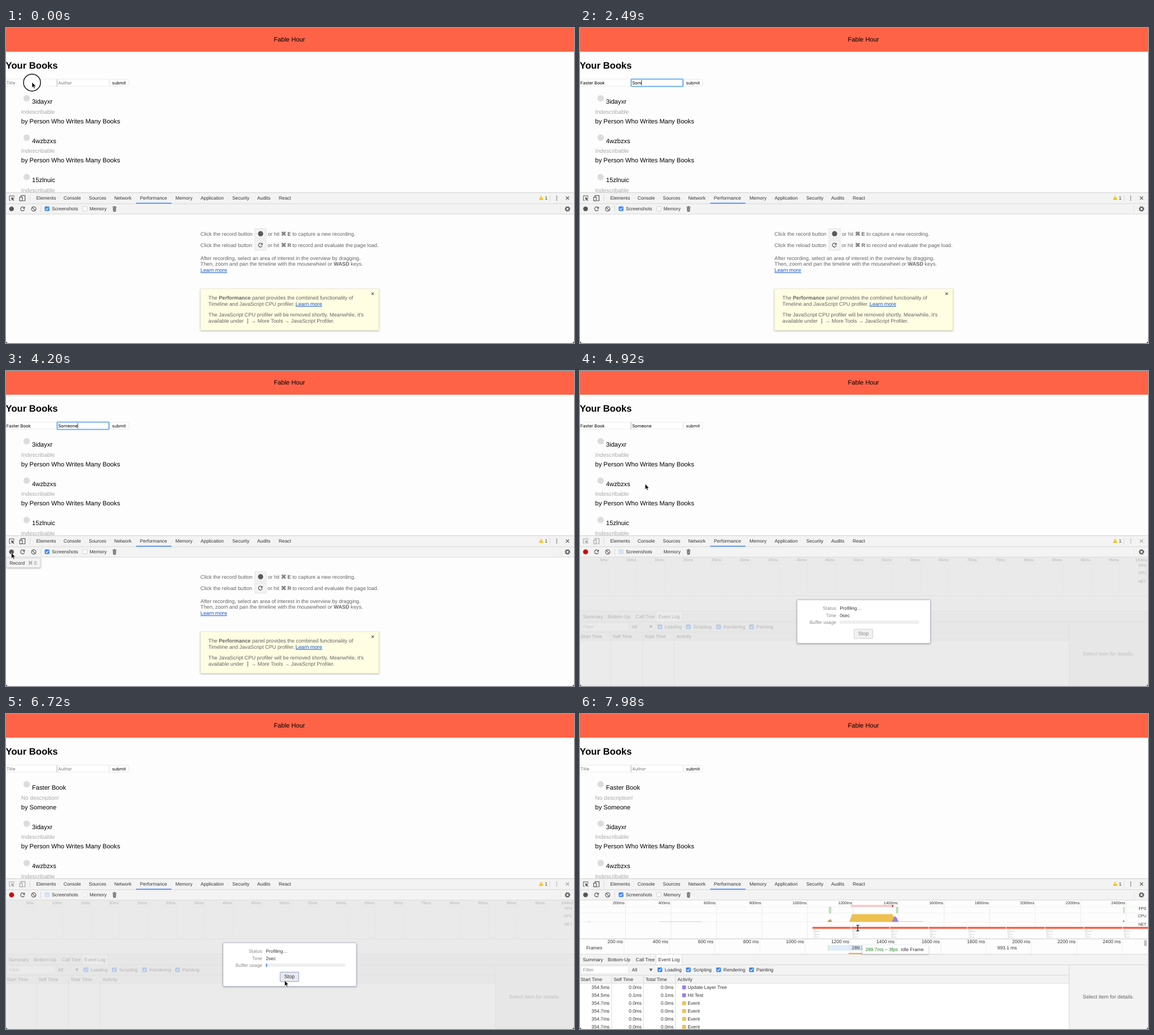
Animation of 1004x558 px, one loop 8 s. Source, as an HTML page:

```html
<!DOCTYPE html>
<html lang="en">
<head>
<meta charset="utf-8">
<title>Book list profiling</title>
<style>
html, body { margin: 0; width: 100%; height: 100%; overflow: hidden; background: #fdfdfd; }
svg { display: block; width: 1004px; height: 558px; }
text { font-family: "Liberation Sans", Arial, sans-serif; font-size: 8.37px; fill: #333; text-rendering: geometricPrecision; white-space: pre; }
.page { font-size: 11.156px; fill: #000; }
.h1 { font-size: 16.6px; font-weight: bold; fill: #000; }
.desc { font-size: 10.04px; fill: #a9a9a9; }
.field { font-family: Inter, "Liberation Sans", sans-serif; font-size: 7.67px; fill: #000; }
.hint { fill: #757575; }
.help { font-size: 9.2px; fill: #646464; }
.link { fill: #15c; text-decoration: underline; }
.tick { font-size: 6.97px; }
.gray { fill: #888; }
.end { text-anchor: end; }
.mid { text-anchor: middle; }
.b { font-weight: bold; }
.btn { font-size: 9.06px; }
.green { fill: #1b7d1b; }
.icon { fill: none; stroke: #5a5a5a; stroke-width: 1.2; }
.shadow { filter: drop-shadow(0 1px 1.5px rgba(0, 0, 0, .3)); }
</style>
</head>
<body>
<svg id="stage" viewBox="0 0 1004 558"></svg>
<script>
const LOOP = 8000;
const RECORD = 4400, PRESS = 5610, ADDED = 5900, STOP = 7150;
const titleKeys = [520, 660, 800, 930, 1040, 1160, 1280, 1420, 1540, 1680, 1800];
const authorKeys = [2220, 2340, 2460, 2580, 2700, 2820, 2960];
const TITLE_FOCUS = 60, AUTHOR_FOCUS = 2050, BLUR = 4350;

const text = (x, y, s, cls = '') => `<text x="${x}" y="${y}" class="${cls}">${s}</text>`;
const rect = (x, y, w, h, fill, more = '') => `<rect x="${x}" y="${y}" width="${w}" height="${h}" fill="${fill}" ${more}/>`;
const line = (x1, y1, x2, y2, c = '#ccc', w = .7) => `<path d="M${x1} ${y1}L${x2} ${y2}" stroke="${c}" stroke-width="${w}"/>`;
const dot = (x, y, r, fill) => `<circle cx="${x}" cy="${y}" r="${r}" fill="${fill}"/>`;
const icon = (d, more = '') => `<path class="icon" d="${d}" ${more}/>`;
// Visible during each [start, end) pair of times
const during = (times, ...parts) => `<g data-on="${times}">${parts.join('')}</g>`;
const range = (n, f) => Array.from({ length: n }, (_, i) => f(i)).join('');
const row = (list, y, cls) => list.map(([x, s]) => text(x, y, s, cls)).join('');

const reload = (x, y) => icon(`M${x + 2.8} ${y - 2.2}A3.5 3.5 0 1 0 ${x + 3.4} ${y + 1}`) +
  `<path d="M${x + 4} ${y - 4.2}v3.9h-3.9z" fill="#5a5a5a"/>`;
const check = (x, y) => rect(x, y, 8.4, 8.2, '#3b88f5', 'rx="1.6"') +
  icon(`M${x + 2} ${y + 4.2}l1.7 1.8l2.8-4`, 'style="stroke:#fff"');
const cross = (x, y, r) => icon(`M${x - r} ${y - r}l${2 * r} ${2 * r}m0 ${-2 * r}l${-2 * r} ${2 * r}`);
const menuDots = (x, y, gap) => [-gap, 0, gap].map(d => dot(x, y + d, .95, '#5a5a5a')).join('');

function book(i, [title, desc, author]) {
  const y = 124.5 + 69.75 * i;
  return dot(36.5, y, 5.7, '#dcdcdc') + text(46, y + 9.3, title, 'page') +
    text(26.7, y + 27, desc, 'desc') + text(26.7, y + 44.2, 'by ' + author, 'page');
}

function page() {
  const many = t => [t, 'Indescribable', 'Person Who Writes Many Books'];
  const old = ['3idayxr', '4wzbzxs', '15zlnuic'].map(many);
  const list = books => books.slice(0, 3).map((b, i) => book(i, b)).join('');
  const box = (x, w) => rect(x, 90.6, w, 12.4, '#fff', 'stroke="#e6e6da" stroke-width=".7"');
  const ring = (x, w) => rect(x, 90.4, w, 13, '#fff', 'rx="1" stroke="#6fb0f5" stroke-width="2"');
  return rect(0, 0, 1004, 42, '#ff6347') + text(501, 23.8, 'Fable Hour', 'page mid') +
    text(-.4, 72, 'Your Books', 'h1') +
    box(-.5, 90) + box(90.5, 91.5) + line(90.3, 91.5, 90.3, 103, '#aaa') +
    rect(183, 91, 34, 11.8, '#fff', 'rx="2" stroke="#dedede" stroke-width=".7"') +
    during([PRESS, ADDED], rect(182.7, 90.7, 34.8, 12.2, 'url(#press)', 'rx="2"')) +
    text(187.5, 99.8, 'submit', 'field') +
    during([TITLE_FOCUS, AUTHOR_FOCUS], ring(-1, 91)) +
    during([AUTHOR_FOCUS, BLUR], ring(90.5, 91.5)) +
    during([0, titleKeys[0], ADDED, LOOP], text(.8, 99.7, 'Title', 'field hint')) +
    during([0, authorKeys[0], ADDED, LOOP], text(92.2, 99.7, 'Author', 'field hint')) +
    '<text id="title" class="field" x=".8" y="99.7"/><text id="author" class="field" x="92.2" y="99.7"/>' +
    rect(0, 92.4, .8, 9, '#000', 'id="caret"') +
    during([0, ADDED], list(old)) +
    during([ADDED, LOOP], list([['Faster Book', 'No description!', 'Someone'], ...old]));
}

function toolbars() {
  const tabs = [[53.5, 'Elements'], [101.7, 'Console'], [146.6, 'Sources'], [191.2, 'Network'],
    [236.8, 'Performance'], [299.5, 'Memory'], [344, 'Application'], [400, 'Security'],
    [444, 'Audits'], [482, 'React']];
  return rect(0, 291.5, 1004, 267, '#fdfdfd') + rect(0, 291.5, 1004, 38.2, '#f3f3f3') +
    line(0, 291.7, 1004, 291.7, '#bdbdbd') + line(0, 311.2, 1004, 311.2) + line(0, 329.7, 1004, 329.7) +
    rect(230, 309.6, 62.5, 1.6, '#4285f4') + row(tabs, 304.3) +
    icon('M8 305.3H6v-8h8v3', 'stroke-dasharray="2 .5"') +
    '<path d="M9 299.5l6 2.5l-2.5 1l2 2.2l-1 1l-2.1-2.2l-1 2.3z" fill="#5a5a5a"/>' +
    icon('M26.5 299v-2.2h7.2v9.2h-4M24.2 299.6h4.6v6.6h-4.6z') +
    line(42.2, 296, 42.2, 307) +
    '<path d="M946 296.8l4 7.4h-8z" fill="#f4bd00"/>' + line(946, 299.3, 946, 302, '#fff', .9) +
    text(952.5, 304.3, '1') + line(961.5, 296, 961.5, 307) +
    menuDots(973.5, 301.4, 3.2) + cross(992.5, 301.3, 2.8) +
    during([0, RECORD, STOP, LOOP], dot(9.8, 320.4, 4.2, '#555')) +
    during([RECORD, STOP], dot(9.8, 320.4, 4.4, '#d80000')) +
    reload(29.3, 320.4) +
    '<circle class="icon" cx="49" cy="320.5" r="3.9"/>' + icon('M46.3 317.8l5.4 5.4') +
    line(61.5, 315, 61.5, 326) + check(68.4, 316) + text(81, 323.2, 'Screenshots') +
    rect(135.8, 316.3, 7.6, 7.6, '#fff', 'rx="1.5" stroke="#c4c4c4" stroke-width=".8"') + text(147.8, 323.2, 'Memory') +
    icon('M188.3 317.4h7M190.5 316.3h2.6') + '<path d="M189 318.7h5.6l-.6 6.5h-4.4z" fill="#5a5a5a"/>' +
    line(191, 320, 191, 324, '#ddd') + line(192.6, 320, 192.6, 324, '#ddd') +
    line(979.5, 314, 979.5, 327, '#dfdfc8') +
    '<circle class="icon" cx="992.5" cy="320.5" r="2.9" style="stroke-width:1.8"/>' +
    '<circle class="icon" cx="992.5" cy="320.5" r="4.3" stroke-dasharray="1.7 1.68"/>' +
    during([RECORD, STOP], [[0, 293, 40, 17, .5], [966, 293, 38, 17, .5], [67, 315, 11, 10, .8], [135, 315, 10, 10, .7]]
      .map(([x, y, w, h, o]) => rect(x, y, w, h, '#f3f3f3', `opacity="${o}"`)).join(''));
}

function landing() {
  const key = (y, x, letter, rest) => text(x, y, 'or hit', 'help') +
    text(486, y, '⌘', 'help b') + text(497.5, y, letter, 'help b') + text(506.3, y, rest, 'help');
  const button = y => rect(440, y, 20, 17.6, '#f3f3f3', 'stroke="#dcdcdc" stroke-width=".8"');
  return text(343.8, 368.3, 'Click the record button', 'help') + button(355.6) + dot(450, 364.4, 4.6, '#5a5a5a') +
    key(368.3, 463, 'E', 'to capture a new recording.') +
    text(343.8, 388.4, 'Click the reload button', 'help') + button(375.8) + reload(449.6, 384.6) +
    key(388.4, 462.3, 'R', 'to record and evaluate the page load.') +
    text(343.8, 410.8, 'After recording, select an area of interest in the overview by dragging.', 'help') +
    text(343.8, 421.4, 'Then, zoom and pan the timeline with the mousewheel or <tspan class="b">WASD</tspan> keys.', 'help') +
    text(343.8, 432, 'Learn more', 'help link') +
    rect(344, 462, 315, 73.5, '#fffde2', 'class="shadow" stroke="#ecebc8" stroke-width=".6"') + cross(648.2, 470.6, 2) +
    text(357.8, 481.2, 'The <tspan class="b">Performance</tspan> panel provides the combined functionality of', 'help') +
    text(357.8, 491.8, 'Timeline and JavaScript CPU profiler.', 'help') + text(511.8, 491.8, 'Learn more', 'help link') +
    text(357.8, 511, 'The JavaScript CPU profiler will be removed shortly. Meanwhile, it\'s', 'help') +
    text(357.8, 521.6, 'available under', 'help') + menuDots(427.3, 519.3, 3) +
    text(433, 521.6, '→ More Tools → JavaScript Profiler.', 'help');
}

function drawer() {
  const filters = [[137, 'Loading'], [187.4, 'Scripting'], [240.8, 'Rendering'], [299, 'Painting']];
  return rect(0, 425.5, 1004, 133, '#f3f3f3') + line(0, 425.5, 1004, 425.5) +
    rect(134.3, 426, 46, 18.5, '#fff') + line(134.3, 426, 134.3, 444) + line(180.3, 426, 180.3, 444) +
    line(0, 444.3, 1004, 444.3) +
    row([[5, 'Summary'], [49, 'Bottom-Up'], [98.6, 'Call Tree'], [138.6, 'Event Log']], 438.2) +
    rect(2, 446.5, 83.5, 13.4, '#fff', 'stroke="#ddd" stroke-width=".6"') + text(5.5, 456.3, 'Filter', 'gray') +
    text(91.8, 456.3, 'All') + '<path d="M122.3 451h6l-3 5z" fill="#666"/>' +
    filters.map(([x, s]) => check(x, 449) + text(x + 12.8, 456.3, s)).join('') +
    rect(0, 477, 864.5, 82, '#fff') + line(0, 462.7, 864.5, 462.7) + line(0, 477, 864.5, 477) +
    line(864.7, 444.5, 864.7, 558) + text(934, 504.2, 'Select item for details.', 'mid help') +
    text(1, 473, 'Start Time');
}

const columns = xs => xs.map((x, i) =>
  line(x, 463, x, 558) + text(x + 3.4, 473, ['Self Time', 'Total Time', 'Activity'][i])).join('');

const scale = (n, step, ms, top) => range(n, i => {
  const x = step * (i + 1);
  return line(x, top, x, 398, '#e4e4e4') + text(x - 1.6, 337.2, (i + 1) * ms + 'ms', 'tick end');
});
const lanes = () => text(1001, 347.3, 'FPS', 'tick end') + text(1001, 360, 'CPU', 'tick end') + text(1001, 375, 'NET', 'tick end') +
  [341.5, 352.7, 368.3].map(y => line(0, y, 1004, y, '#eee')).join('') + line(0, 398.3, 1004, 398.3);

function recording() {
  return scale(20, 50.2, 5, 330) + lanes() + columns([54, 110.5, 167]) +
    rect(0, 330, 1004, 228, '#e3e3e3', 'opacity=".72"') +
    rect(383.7, 405.3, 235.6, 77, '#fff', 'class="shadow" rx="1" stroke="#a9b0c8" stroke-width=".8"') +
    row([[453, 'Status'], [453, 'Time'], [453, 'Buffer usage']].slice(0, 1), 423, 'end gray') +
    text(453, 435.6, 'Time', 'end gray') + text(453, 448.2, 'Buffer usage', 'end gray') +
    text(459.2, 423, 'Profiling…') +
    [0, 1, 2].map(s => during([s ? RECORD + 110 + s * 1000 : RECORD, s < 2 ? RECORD + 1110 + s * 1000 : STOP],
      text(459.2, 435.6, s + 'sec'), rect(459.3, 442.2, 140, 5.6, '#eee'), rect(459.3, 442.2, s * 1.2, 5.6, '#6d97ee'))).join('') +
    rect(484.5, 457.3, 33, 16.6, '#f1f1f1', 'rx="1" stroke="#c8c8c8" stroke-width=".8"') +
    during([0, 6500], text(501, 468.3, 'Stop', 'btn mid gray')) +
    during([6500, STOP], rect(484.5, 457.3, 33, 16.6, '#e8e9ef', 'rx="1" stroke="#8f9cc4" stroke-width=".9"'),
      text(501, 468.3, 'Stop', 'btn mid'));
}

function thumb(i) {
  const x = 411 + 68.55 * i;
  return rect(x, 376.6, 67.6, 20.8, '#fff') + rect(x, 377, 67.6, 3.6, '#f9624a') +
    range(6, k => line(x + 1 + (k > 1 ? 1 : 0), 382.8 + k * 2.5, x + [7, 14, 6, 12, 6, 12][k], 382.8 + k * 2.5, '#bbb', .7));
}

function results() {
  const events = [['354.5', '0.0', 'Update Layer Tree'], ['354.5', '0.1', 'Hit Test'],
    ...Array(4).fill(['354.7', '0.0', 'Event'])];
  const fps = (x, w) => rect(x, 342.4, w, 9.8, '#cdeccb', 'stroke="#7cc67a" stroke-width=".7"');
  return scale(12, 80.45, 200, 330) + lanes() +
    rect(478.5, 338.2, 73, 3.6, '#fbc6c6') + rect(551.5, 338.2, 2.4, 3.6, '#e0262c') +
    fps(440.6, 2.8) + fps(559.4, 2) + fps(961, .8) +
    '<path d="M476 368.2L481 354.5H552L560 368.2z" fill="#edc050"/>' +
    '<path d="M551 368.2L556 358L560 361L563 368.2z" fill="#9a82dc"/>' +
    '<path d="M437 368.2l3-4l2 1l1-2.6l2.5 5.6z" fill="#b3a06a"/><path d="M959 368.2l2-4l2 4z" fill="#85ad7c"/>' +
    line(140, 367.8, 215, 367.8, '#ddc88c') + line(14, 367.6, 18, 367.6, '#b3a5d8') + line(563, 367.6, 606, 367.6, '#c9bfa0') +
    range(9, thumb) + line(0, 398.3, 1004, 398.3) +
    range(12, i => line(80 * (i + 1) - 2, 399, 80 * (i + 1) - 2, 425, '#e6e6e6') +
      text(80 * (i + 1) - 4, 406.3, (i + 1) * 200 + ' ms', 'end')) +
    text(11, 417.3, 'Frames') + rect(438, 409.2, 1.6, 10, '#bfe8bd') + rect(440, 409.2, 36, 10, '#e2edfa') +
    rect(476, 409.2, 108, 10, '#d9e8f8') + text(480.5, 417.3, '289.7 ms') + text(737.8, 417.3, '993.1 ms') +
    rect(475, 423.4, 24.5, 2, '#eaa43c') + rect(997, 400.3, 5, 11, '#c1c1c1', 'rx="2.5"') +
    columns([56, 112.3, 168.8]) +
    events.map(([start, self, name], i) => {
      const y = 487.3 + 13.95 * i;
      return text(52.3, y, start + 'ms', 'end') + text(109, y, self + 'ms', 'end') + text(165.5, y, self + 'ms', 'end') +
        rect(180.6, y - 6.4, 6.8, 6.8, i < 2 ? '#9a7ee6' : '#eebf54') + text(190.3, y, name);
    }).join('') +
    during([7500, LOOP], rect(499, 409.3, 117, 15.8, '#fff', 'class="shadow"') +
      text(504.5, 420, '289.7ms ~ 3fps', 'green') + text(567.5, 420, 'Idle Frame'));
}

const pointer = () => '<g id="pointer">' +
  during([0, 120, 4300, 4400, 5590, 5690, 6890, 6990],
    '<circle r="15" cy=".7" fill="#fff" fill-opacity=".5" stroke="#111" stroke-width="1.5"/>') +
  during([0, titleKeys[0], 3150, 7450],
    '<path d="M0 0V9.8L2.2 7.7L3.8 11.2L5.4 10.5L3.9 7.2H6.9z" fill="#000" stroke="#fff" stroke-width=".6"/>') +
  during([7450, LOOP], icon('M-2.4-4.8Q0-4.8 0-3.4Q0-4.8 2.4-4.8M0-3.4V3.8M-2.4 5.2Q0 5.2 0 3.8Q0 5.2 2.4 5.2', 'style="stroke:#111"')) + '</g>';

const stage = document.getElementById('stage');
stage.innerHTML = '<defs><linearGradient id="press" x2="0" y2="1"><stop stop-color="#5ba0fa"/><stop offset="1" stop-color="#1668f0"/></linearGradient></defs>' +
  rect(0, 0, 1004, 558, '#fdfdfd') + page() + toolbars() +
  during([0, RECORD], landing()) +
  during([RECORD, LOOP], drawer()) +
  during([RECORD, STOP], recording()) +
  during([STOP, LOOP], results()) +
  during([4050, RECORD], rect(.7, 331.3, 60.3, 16.8, '#f3f3f3', 'class="shadow" stroke="#d0d0d0" stroke-width=".6"') +
    text(6.2, 342.6, 'Record') + text(39, 342.6, '⌘', 'gray') + text(49.8, 342.6, 'E', 'gray')) +
  '<path d="M0 554.5V558H4Q.8 557.6 0 554.5zM1004 554.5V558H1000Q1003.2 557.6 1004 554.5z" fill="#333"/>' + pointer();

const timed = [...stage.querySelectorAll('[data-on]')].map(el => ({ el, times: el.dataset.on.split(',').map(Number) }));
const [titleEl, authorEl, caretEl, pointerEl] = ['title', 'author', 'caret', 'pointer'].map(id => document.getElementById(id));
const moves = [[0, 46, 96], [3150, 46, 96], [3750, 9.5, 322], [4450, 9.5, 322], [5350, 207, 94],
  [6000, 207, 94], [6600, 492.5, 472], [7200, 492.5, 472], [7700, 491, 379], [LOOP, 491, 379]];

function pointerAt(t) {
  const i = moves.findIndex(m => m[0] > t);
  const [t0, x0, y0] = moves[i - 1], [t1, x1, y1] = moves[i];
  const u = (t - t0) / (t1 - t0), e = u * u * (3 - 2 * u);
  return [x0 + (x1 - x0) * e, y0 + (y1 - y0) * e];
}

const typed = (s, keys, t) => t < ADDED ? s.slice(0, keys.filter(k => k <= t).length) : '';

function draw(t) {
  for (const { el, times } of timed) {
    const on = times.some((a, i) => i % 2 === 0 && t >= a && t < times[i + 1]);
    el.style.display = on ? '' : 'none';
  }
  titleEl.textContent = typed('Faster Book', titleKeys, t);
  authorEl.textContent = typed('Someone', authorKeys, t);

  const inTitle = t < AUTHOR_FOCUS;
  const input = inTitle ? titleEl : authorEl;
  const last = Math.max(...[TITLE_FOCUS, AUTHOR_FOCUS, ...titleKeys, ...authorKeys].filter(k => k <= t));
  const caretOn = t >= TITLE_FOCUS && t < BLUR && (t - last) % 1000 < 500;
  caretEl.style.display = caretOn ? '' : 'none';
  if (caretOn) caretEl.setAttribute('x', (inTitle ? .8 : 92.2) + input.getComputedTextLength());

  pointerEl.setAttribute('transform', `translate(${pointerAt(t)})`);
}

const start = performance.now();
function tick() {
  draw((performance.now() - start) % LOOP);
  requestAnimationFrame(tick);
}
tick();
</script>
</body>
</html>
```
